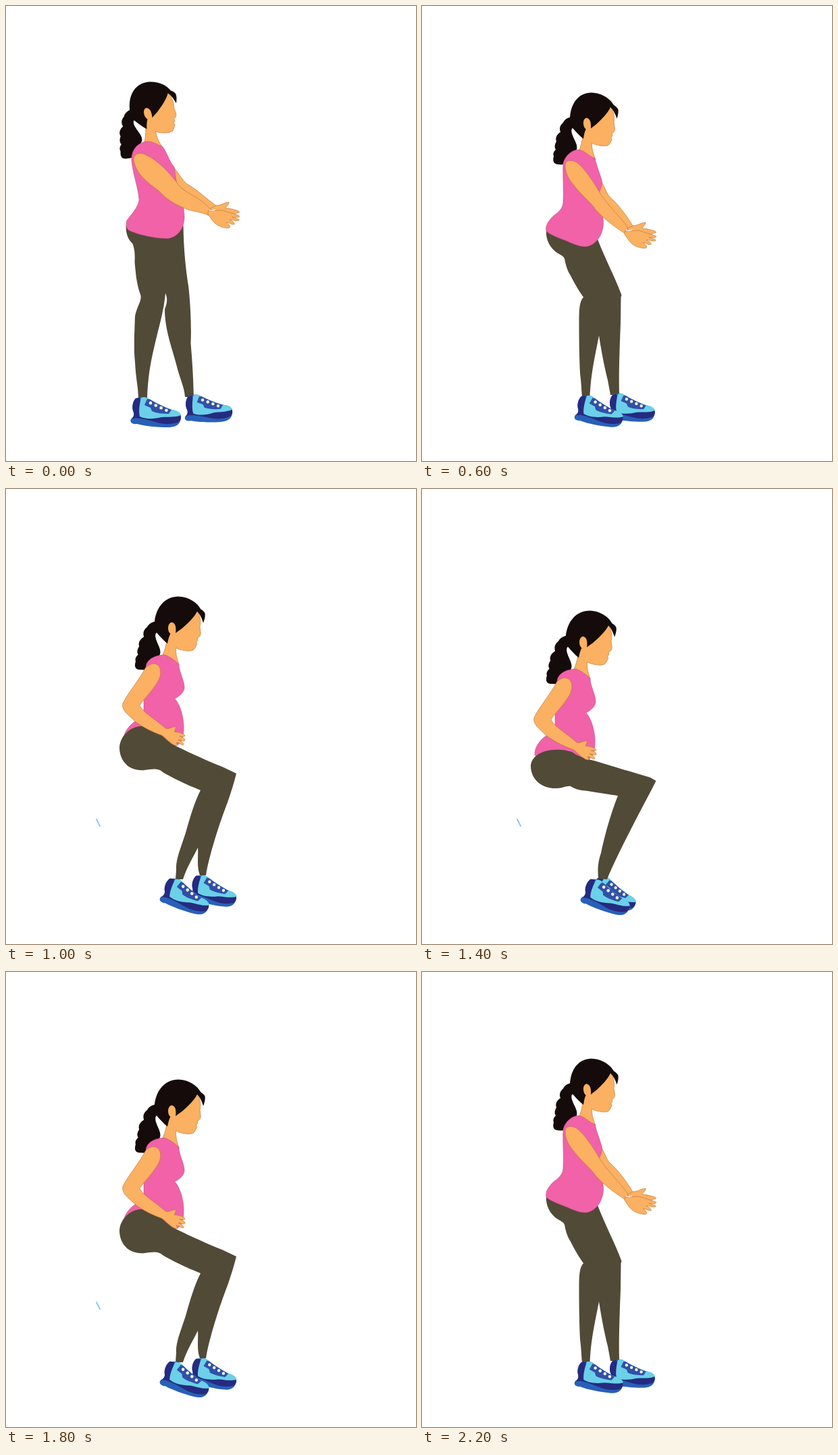
An HTML page for the animation above (2.6 s loop, 607 by 675 pixels).

```html
<!DOCTYPE html>
<html lang="en">
<head>
<meta charset="utf-8">
<title>Squat exercise</title>
<style>
  html, body { margin: 0; width: 100%; height: 100%; overflow: hidden; background: #fff; }
  svg { display: block; width: 100vw; height: 100vh; }
  .skin { fill: #fbb062; stroke: #b07838; stroke-width: .6; stroke-linejoin: round; }
  .flesh { fill: #fbb062; }
  .hair { fill: #150b0b; }
  .shirt { fill: #f162a8; stroke: #b2487e; stroke-width: .5; }
  .legs { fill: #504a37; }
  .navy { fill: #262a80; }
  .blue { fill: #2860b8; }
  .cyan { fill: #6bd0e8; }
  .panel { fill: #3050a8; }
  .lace { fill: none; stroke: #f6f1d3; stroke-width: 4.8; stroke-linecap: round; stroke-dasharray: 0 8.6; }
  .tick { stroke: #8ecbea; stroke-width: 2; stroke-linecap: round; }

  /* hard pose changes: stand, dip, squat, deep, squat, dip */
  .pose { visibility: hidden; animation: 2.6s step-end infinite; }
  .stand { animation-name: stand; }
  .dip { animation-name: dip; }
  .squat { animation-name: squat; }
  .deep { animation-name: deep; }
  @keyframes stand { 0% { visibility: visible } 23.077%, 100% { visibility: hidden } }
  @keyframes dip {
    0% { visibility: hidden } 23.077% { visibility: visible }
    38.462% { visibility: hidden } 84.615%, 100% { visibility: visible }
  }
  @keyframes squat {
    0% { visibility: hidden } 38.462% { visibility: visible } 53.846% { visibility: hidden }
    69.231% { visibility: visible } 84.615%, 100% { visibility: hidden }
  }
  @keyframes deep {
    0% { visibility: hidden } 53.846% { visibility: visible } 69.231%, 100% { visibility: hidden }
  }
</style>
</head>
<body>
<svg viewBox="0 0 607 675" preserveAspectRatio="none">
  <defs>
    <g id="head">
      <path class="hair" d="M224 164C216 165 211 168 209 173C204 177 203 182 205 187C199 191 197 196 199 201C196 206 196 210 198 213C194 217 194 220 195 223C193 231 195 235 203 235C209 236 214 234 218 228L229 213C231 206 226 200 223 192C220 185 221 180 226 180Z"/>
      <path class="skin" d="M278 148C284 155 285.500 165 284 173L285.500 181C286 185 284 188 281 189L282 192L280 195L281 198C279.500 201 279 204 276 206.500C271 209 261 207 255 205L251.500 203C251 212 254 220 257 228L240 232L232 216C237 205 237 196 240 185L240 166Z"/>
      <path class="hair" d="M219 167C220 143 233 128.500 251 128.500C267 129 279 138 284 147C287 149 290 151 290.500 154C291 158 290 163 288.500 167C286.500 161 284 155 279 150C276 158 266 168 258.500 175L252 180C250 182 247 185 243 182C240 188 240 192 239 197C234 193 228 187 222 180Z"/>
      <path class="flesh" d="M250 177C250 170 247 166 243 166C237 168 238 180 243 183L250 186Z"/>
    </g>

    <g id="hands">
      <path class="skin" d="M303 300L311 296C318 296 324 291 330 291C331 294 326 297 325 300C332 300 338 302 344 304C347 306 345 307 342 307L330 313L305 305Z"/>
      <path class="skin" d="M299 304C306 304 314 303 320 303C328 306 338 308 345 311C348 314 340 314 335 313C340 315 346 316 345 318C342 320 335 317 331 317C336 319 339 322 338 324C335 325 330 321 326 321C331 324 333 328 331 329C326 330 320 329 313 325C306 321 303 314 299 309Z"/>
      <path d="M301 302.500Q306 304.500 310 302" fill="none" stroke="#fff" stroke-width="1.200"/>
    </g>

    <g id="shoe">
      <path class="blue" d="M14 2C22-1 26 3 28 4C34 8 52 17 62 20C72 22 76 26 75 32C74 40 70 46 56 46C40 46 20 44 10 41C2 42-1 38 1 34C5 31 6 28 5 24C2 18 3 8 8 3Z"/>
      <path class="navy" d="M14 2L8 3C3 8 2 18 5 24C6 28 5 31 1 34C6 32 10 32 15 33C24 34 32 37 40 39C50 42 62 42 72 38C75 35 76 31 74 28L40 28L18 28Z"/>
      <path class="cyan" d="M16 2C22 0 25 2 28 4C34 8 52 17 62 20C70 21 74 24 75 28C66 32 56 30 46 31C34 34 22 34 14 30C12 22 14 10 16 2Z"/>
      <path class="panel" d="M25 4L29 4.500C38 10 50 16 61 20L57 26C48 26 38 25 32 22L30 17L21 13Z"/>
      <path class="lace" d="M30 10L56 22"/>
    </g>

    <g id="torso">
      <use href="#head" transform="matrix(1.040 0 -.050 1.020 .300 28.400)"/>
      <path class="shirt" d="M207 264C208 252 222 246 235 246C243 249 250 254 256 260C256 272 265 285 264 296C262 305 253 309 250 311C258 320 264 340 263 357C263 370 258 381 250 381L200 382L174 374C173 362 182 351 192 344L204 330V290Z"/>
    </g>

    <path id="arm" class="skin" d="M206 266C212 259 222 256 227 264C231 272 228 282 222 290C214 302 204 312 198 321C203 332 222 342 236 355C242 357 246 352 252 353C250 357 250 359 249 360C256 361 264 363 265 366C265 368 260 367 257 367C263 368 267 372 264 374C261 374 258 372 255 372C260 374 265 378 262 380C258 379 256 376 252 376C254 379 255 381 252 381C245 379 238 371 232 366C215 360 195 350 184 338C178 333 171 326 173 318C180 303 198 282 206 266Z"/>
  </defs>

  <g class="pose stand">
    <use href="#head" transform="translate(-35 -15) rotate(-10 244 172)"/>
    <path class="legs" d="M179 318C176 330 178 344 187 352C191 360 191 372 190.500 380C192 395 193 412 199 428C202 436 194 445 191 460C190 490 189 510 191 528C192 552 196 566 196 583H209C210 545 216 520 222 495C228 470 234 450 236 426C240 435 238 442 235 450C235 480 246 508 253 535C258 555 264 565 265 580H278C277 540 275 520 273.500 500C275 470 272 430 270 415C266 390 263 360 262.500 326Z"/>
    <path class="skin" d="M246 236C257 250 262 259 268 264C283 272 298 287 311 296L303 304L250 262Z"/>
    <path class="shirt" d="M208 201C216 200 224 206 231 208C238 215 241 230 249 239C251 250 251 262 257 275C262 287 263 297 264 310C265 328 256 342 240 345C220 345 195 339 182 333C178 330 177 325 179 318C185 310 196 298 197 288C196 270 188 250 186 230C185 214 194 203 208 201Z"/>
    <path class="skin" d="M189 229C188 219 199 216 207 221C222 227 240 245 253 262C257 270 268 276 280 283C290 289 298 296 304 303L300 311C293 307 285 306 272 303C255 297 238 288 226 274C210 262 193 250 189 229Z"/>
    <use href="#hands"/>
    <use href="#shoe" transform="translate(262 577) rotate(-4) scale(.95)"/>
    <use href="#shoe" transform="translate(184 579)"/>
  </g>

  <g class="pose dip">
    <use href="#head"/>
    <path class="legs" d="M184 333C183 343 187 355 196 363C202 369 209 369 211 375C213 385 215 392 220 400C226 412 233 424 239 432C233 438 232.500 450 232.500 470C232.500 500 233 525 234 545C236 560 236 570 237 579H248.500C250 545 256 520 262 489C266 515 271 540 275 555L279 577H292C291 540 293 500 294 470L294.500 432L295.500 429C287 405 271 375 260 346Z"/>
    <path class="skin" d="M265 259C271 270 274 279 278 283C290 294 300 306 312 326L306 332L262 280Z"/>
    <path class="shirt" d="M209 233C212 222 222 213 232 213C242 215 247 223 256 226C258 235 262 245 265 255C268 262 266 270 262 276C266 290 267 303 268 315C271 335 260 352 247 356C240 359 228 355 215 349C203 344 190 340 184 334C182 325 188 318 195 311C205 304 209 298 209 290C210 270 208 250 209 233Z"/>
    <path class="skin" d="M212 236C212 228 222 228 229 232C240 240 252 258 262 275C267 284 275 293 285 305C295 316 302 324 306 332L301 338C286 328 268 315 257 302C250 291 235 280 225 266C216 256 212 246 212 236Z"/>
    <use href="#hands" x="1" y="30"/>
    <use href="#shoe" transform="translate(275 574) scale(.93)"/>
    <use href="#shoe" transform="translate(229 575) rotate(6) scale(.96)"/>
  </g>

  <g class="pose squat">
    <use href="#torso"/>
    <path class="legs" d="M198 352C182 354 168 368 168 385C169 405 183 419 205 417C215 416 225 413 232 420C245 428 270 440 288 447C280 462 273 485 266 510C258 535 251 550 252 565L251 579H262C268 560 278 545 284 532C285 545 282 560 287 573H296C300 545 318 490 328 465C333 450 338 435 341 422L320 412C295 402 265 388 245 378C235 370 228 363 222 358C215 354 208 352 198 352Z"/>
    <use href="#arm"/>
    <use href="#shoe" transform="translate(274.500 570) rotate(7) scale(.94)"/>
    <use href="#shoe" transform="translate(236 573) rotate(14) scale(.98)"/>
    <path class="tick" d="M134 490L139 500"/>
  </g>

  <g class="pose deep">
    <use href="#torso" x="-7" y="21"/>
    <use href="#shoe" transform="translate(256 571) rotate(14) scale(.92)"/>
    <path class="legs" d="M195 387C175 388 161 398 161 412C162 432 178 445 200 444C208 444 214 440 220 441C228 446 235 447 245 448L290 455C280 480 270 515 265 540C260 555 260 565 261 578L274 579C283 556 304 515 322 480C331 463 339 448 346.500 433L338 428C315 421 280 411 255 403C240 400 228 395 222 390C212 387 205 386 195 387Z"/>
    <use href="#arm" x="-7" y="21"/>
    <use href="#shoe" transform="translate(243 574) rotate(14) scale(.98)"/>
    <path class="tick" d="M141 490L146 500"/>
  </g>
</svg>
</body>
</html>
```
